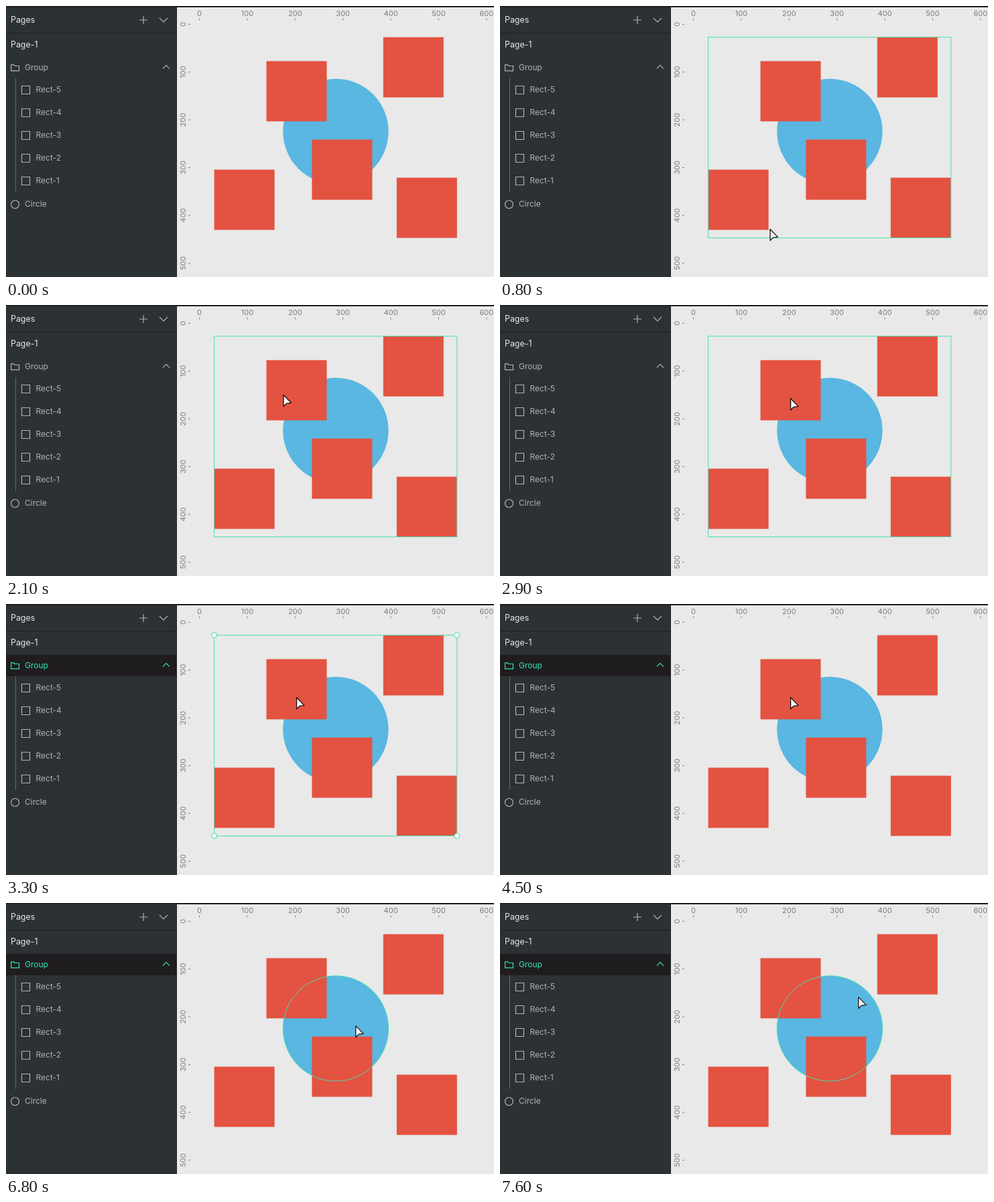
An HTML page that plays this animation: 728x405 px, repeating every 8 s.

```html
<!DOCTYPE html>
<html lang="en">
<head>
<meta charset="utf-8">
<title>Group selection</title>
<style>
  html, body { margin: 0; width: 100%; height: 100%; overflow: hidden; background: #e8e9e8; }
  svg { display: block; width: 728px; height: 405px; font: 12px Inter, sans-serif; }
  .ruler text { font-size: 11px; fill: #7b7c85; text-anchor: middle; }
  .ruler path { stroke: #7b7c85; }
  .title { font-size: 12.4px; fill: #e6e7e8; }
  .item { fill: #b1b2b5; }
  .icon { fill: none; stroke: #b1b2b5; stroke-width: 1.2; }
  .hover { fill: none; stroke: #49e0b3; }
  .handle { fill: #fff; stroke: #31d9a8; }
  .row { fill: none; }
  .active .row { fill: #1f1d20; }
  .active .item { fill: #31e6b0; }
  .active .icon { stroke: #31e6b0; }
  .pointer { fill: #fff; stroke: #111; stroke-width: 1.3; stroke-linejoin: round; }
</style>
</head>
<body>
<svg id="stage" viewBox="0 0 728 405"></svg>
<script>
const LOOP = 8000, STEP = 100;
const SELECT_AT = 3300, ENTER_AT = 4500, PICK_AT = 5000;
const SIZE = 90;

const square = (x, y) => ({ x, y, width: SIZE, height: SIZE });
const squares = [
  square(310.6, 244.6), square(388.5, 82.4), square(456.4, 199.6),
  square(562.8, 46.6), square(582.8, 256.6)
];
const disc = { cx: 491.9, cy: 187.5, r: 78.7 };
const group = boundsOf(squares);

// The pointer rests between moves.
const START = [440, 430];
const move = (start, end, x, y) => ({ start, end, x, y });
const MOVES = [
  move(500, 1500, 316.8, 108.5),
  move(1500, 1800, 274, 114),
  move(1900, 2300, 554, 155),
  move(2500, 2900, 433.6, 139.8),
  move(4900, 5600, 357.8, 312.8),
  move(5800, 6400, 546, 228),
  move(6600, 6800, 521.8, 183.6),
  move(6800, 7000, 548, 135),
  move(7400, 7600, 534.8, 140.6)
];

function boundsOf(boxes) {
  const x = Math.min(...boxes.map(b => b.x)), y = Math.min(...boxes.map(b => b.y));
  const right = Math.max(...boxes.map(b => b.x + b.width));
  const bottom = Math.max(...boxes.map(b => b.y + b.height));
  return { x, y, width: right - x, height: bottom - y };
}

const stage = document.getElementById('stage');

function add(tag, attrs, parent = stage, text) {
  const node = document.createElementNS('http://www.w3.org/2000/svg', tag);
  setAttrs(node, attrs);
  if (text !== undefined) node.textContent = text;
  return parent.appendChild(node);
}
function setAttrs(node, attrs) {
  for (const key in attrs) node.setAttribute(key, attrs[key]);
}
const show = (node, on) => { node.style.display = on ? '' : 'none'; };
const label = (x, y, text, kind, parent) => add('text', { x, y, class: kind }, parent, text);
const icon = (d, parent) => add('path', { d, class: 'icon' }, parent);

function drawRulers() {
  const ruler = add('g', { class: 'ruler' });
  for (let i = 0; i <= 6; i++) {
    const x = 288.5 + i * 71.4, y = 27.3 + i * 71.4;
    add('text', { x, y: 15 }, ruler, i * 100);
    add('path', { d: `M${x} 18.5v3` }, ruler);
    if (i === 6) break;
    add('text', { transform: `translate(267.5 ${y}) rotate(-90)` }, ruler, i * 100);
    add('path', { d: `M272 ${y}h3` }, ruler);
  }
}

function drawSidebar() {
  add('rect', { width: 255, height: 405, fill: '#2c3134' });
  add('path', { d: 'M0 40.5H254M254.5 0V405', stroke: '#1d1f21' });
  add('rect', { width: 728, height: 2, fill: '#1f2123' });
  label(7, 25, 'Pages', 'title');
  label(7, 62, 'Page-1', 'title');
  icon('M199 21h12M205 15v12M229 18l6 6 6-6');

  const row = add('g');
  add('rect', { y: 76, width: 254, height: 32, class: 'row' }, row);
  icon('M7.6 96.9v-9h4l1.3 1.6h6.6v7.4zM234 93.6l5-5 5 5', row);
  label(28, 96, 'Group', 'item', row);

  add('path', { d: 'M14.5 108V278', stroke: '#64696c' });
  squares.forEach((_, i) => {
    icon(`M23.5 ${119.5 + i * 34}h12v12h-12z`);
    label(44.5, 129.4 + i * 34, `Rect-${squares.length - i}`, 'item');
  });
  add('circle', { cx: 13.5, cy: 296.5, r: 6, class: 'icon' });
  label(28, 300.3, 'Circle', 'item');
  return row;
}

add('rect', { width: 728, height: 405, fill: '#e8e9e8' });
drawRulers();
add('circle', { ...disc, fill: '#59b7e1' });
squares.forEach(box => add('rect', { ...box, fill: '#e45241' }));

const groupOutline = add('rect', { ...group, class: 'hover' });
const squareOutline = add('rect', { class: 'hover' });
const discOutline = add('circle', { ...disc, class: 'hover' });
const handles = add('g');
for (const cx of [group.x, group.x + group.width])
  for (const cy of [group.y, group.y + group.height])
    add('circle', { cx, cy, r: 4, class: 'handle' }, handles);

const groupRow = drawSidebar();
const pointer = add('path', { d: 'M0 0V17L4.4 12.6 11.4 11.8Z', class: 'pointer' });

function pointerAt(t) {
  return MOVES.reduce(([px, py], { start, end, x, y }) => {
    const k = Math.min(1, Math.max(0, (t - start) / (end - start)));
    return [px + (x - px) * k, py + (y - py) * k];
  }, START);
}

const inBox = (x, y, b) => x >= b.x && x <= b.x + b.width && y >= b.y && y <= b.y + b.height;
const inDisc = (x, y) => Math.hypot(x - disc.cx, y - disc.cy) <= disc.r;

function render(time) {
  const t = Math.floor(time / STEP) * STEP;
  const [x, y] = pointerAt(t);
  const selected = t >= SELECT_AT && t < ENTER_AT;
  const picking = t >= PICK_AT;
  const hit = picking && squares.find(box => inBox(x, y, box));

  pointer.setAttribute('transform', `translate(${x} ${y})`);
  show(groupOutline, selected || (t < ENTER_AT && inBox(x, y, group)));
  show(handles, selected);
  show(squareOutline, hit);
  show(discOutline, picking && !hit && inDisc(x, y));
  if (hit) setAttrs(squareOutline, hit);
  groupRow.setAttribute('class', t >= SELECT_AT ? 'active' : '');
}

function tick() {
  render(performance.now() % LOOP);
  requestAnimationFrame(tick);
}
tick();
</script>
</body>
</html>
```
